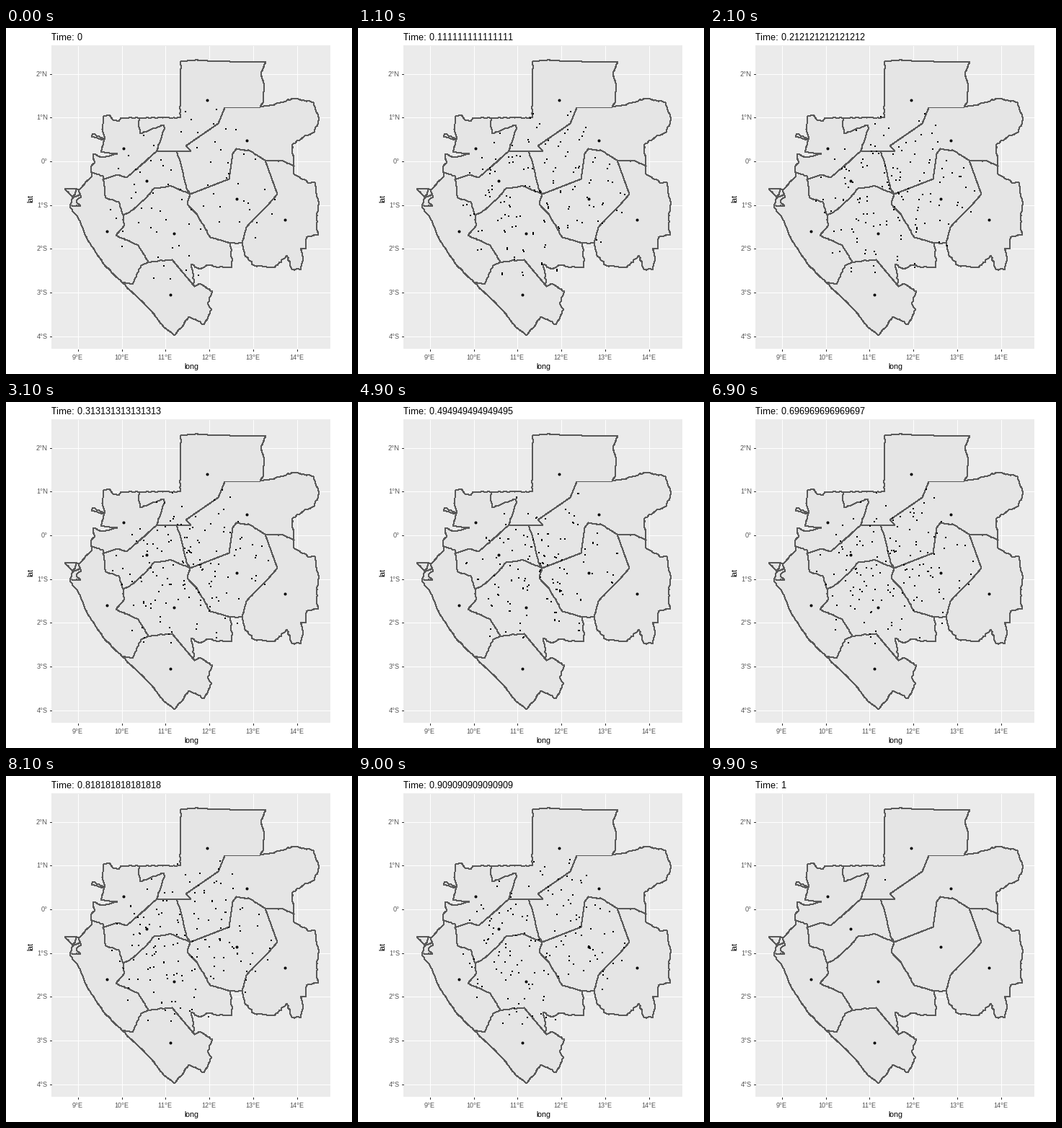
These frames come from a looping animation (480 px wide and 480 px high, 10000 ms). A matplotlib script:

```python
import numpy as np
import matplotlib.pyplot as plt
from matplotlib.animation import FuncAnimation
from matplotlib.patches import Rectangle

FRAMES = 100
SIZE = 480
DEG = 60.7
X9, Y0 = 99.5, 184.5
LEFT, TOP, RIGHT, BOTTOM = 63, 24, 450, 445
INK, TICK, LABEL = "#595959", "#333333", "#4D4D4D"

plt.rcParams.update({
    "font.family": "Liberation Sans",
    "text.hinting": "native",
    "text.hinting_factor": 1,
    "path.simplify": False,
})

rng = np.random.default_rng(4)

# Province centres, in alphabetical order of province
CENTRES = np.array([(162, 166), (386, 265), (194, 211), (232, 284), (227, 369),
                    (333, 155), (319, 236), (139, 281), (278, 99)], float)

# Outline, clockwise; each part starts where the one before it ends
NORTH = [(133, 140), (135, 122), (143, 120), (148, 127), (156, 129), (159, 124),
         (241, 124), (242, 46), (262, 44), (305, 46), (360, 47)]
EAST = [(353, 62), (357, 80), (357, 102), (352, 109), (373, 105), (400, 97),
        (426, 103), (434, 126), (427, 144), (414, 149), (396, 162), (399, 191),
        (398, 201), (418, 214), (428, 214), (433, 240), (430, 272), (433, 286),
        (416, 290), (416, 305), (408, 306), (412, 318), (408, 335), (396, 334),
        (389, 315), (372, 332), (344, 329), (330, 314), (327, 298)]
SOUTH = [(311, 298), (313, 332), (288, 331), (281, 328), (268, 334), (257, 327),
         (261, 358), (268, 354), (286, 365), (279, 381), (285, 390), (274, 411),
         (253, 400), (244, 414), (233, 426)]
COAST = [(218, 414), (199, 390), (185, 376), (160, 352), (135, 327), (113, 294),
         (99, 262), (88, 248), (92, 234), (81, 222), (102, 223), (119, 204),
         (117, 192), (122, 187), (120, 174), (133, 179), (154, 174), (131, 171),
         (136, 155), (118, 150), (120, 146), (137, 154), (133, 140)]
LAGOON = [(97, 224), (92, 236), (103, 231), (100, 225), (104, 234), (97, 239),
          (103, 247), (91, 246)]

STRAIGHT = [
    [(352, 110), (303, 110), (294, 132), (249, 163), (256, 170), (208, 171)],
    [(255, 230), (309, 209), (314, 174), (319, 167)],
    [(359, 183), (376, 230), (362, 246)],
    [(230, 321), (261, 358)],
]
WINDING = [
    [(185, 125), (183, 131), (186, 146), (218, 134), (219, 140), (208, 171),
     (200, 178), (167, 207), (153, 203), (134, 210)],
    [(119, 200), (134, 205), (138, 235), (156, 241), (162, 259), (171, 255),
     (191, 238), (205, 222), (229, 219), (255, 230)],
    [(236, 171), (242, 188), (250, 222), (255, 230), (251, 244), (265, 259),
     (283, 290), (311, 298)],
    [(319, 167), (338, 170), (359, 183), (384, 184), (399, 191)],
    [(362, 246), (343, 265), (333, 276), (327, 298)],
    [(162, 259), (163, 274), (152, 287), (183, 301), (197, 324), (230, 321)],
    [(197, 324), (187, 329), (175, 355), (160, 352)],
]


def rough(points, amp=0.6, step=3):
    """Subdivide a line and nudge the inner points."""
    pts = np.array(points, float)
    out = [pts[:1]]
    for a, b in zip(pts, pts[1:]):
        n = max(1, int(np.hypot(*(b - a)) // step))
        seg = a + (b - a) * np.linspace(0, 1, n + 1)[1:, None]
        seg[:-1] += rng.uniform(-amp, amp, (n - 1, 2))
        out.append(seg)
    return np.vstack(out)


fig = plt.figure(figsize=(SIZE / 72, SIZE / 72), dpi=72, facecolor="white")
ax = fig.add_axes([0, 0, 1, 1])
ax.set_xlim(0, SIZE)
ax.set_ylim(SIZE, 0)
ax.axis("off")


def line(xy, color=INK, z=3):
    x, y = np.asarray(xy, float).T
    ax.plot(x + 0.5, y + 0.5, color=color, lw=1, antialiased=False, zorder=z)


def write(x, y, s, size, color="black", **kw):
    return ax.text(x, y, s, fontsize=size, color=color, **kw)


def draw_panel():
    ax.add_patch(Rectangle((LEFT, TOP), RIGHT - LEFT, BOTTOM - TOP,
                           fc="#EBEBEB", ec="none", zorder=0))
    for lon in range(9, 15):
        x = int(X9 + (lon - 9) * DEG)
        line([(x, TOP), (x, BOTTOM - 1)], "white", 1)
        line([(x, BOTTOM), (x, BOTTOM + 2)], TICK)
        write(x + 0.5, 460, f"{lon}°E", 9, LABEL, ha="center", va="baseline")
    for lat in range(-4, 3):
        y = int(Y0 - lat * DEG)
        line([(LEFT, y), (RIGHT - 1, y)], "white", 1)
        line([(LEFT - 3, y), (LEFT - 1, y)], TICK)
        name = f"{abs(lat)}°" + ("N" if lat > 0 else "S" if lat < 0 else "")
        write(58, y + 4, name, 9, LABEL, ha="right", va="baseline")
    write(257, 473, "long", 11, ha="center", va="baseline")
    write(39, 237, "lat", 11, ha="right", va="center", rotation=90)


def draw_map():
    edge = rough(NORTH, 0.3)
    for part, amp in ((EAST, 1.0), (SOUTH, 0.9), (COAST, 0.6)):
        edge = np.vstack([edge, rough([edge[-1], *part], amp)])
    ax.fill(*(edge + 0.5).T, fc="#E5E5E5", ec="none", zorder=2)
    line(edge)
    line(rough(LAGOON, 0.9))
    for path in STRAIGHT:
        line(path)
    for path in WINDING:
        line(rough(path))


draw_panel()
draw_map()
ax.plot(*(CENTRES + 0.5).T, "o", color="black", ms=4, mew=0, zorder=5)

# Each trip covers the middle half of the way between two centres
trips = [(a, b) for b in range(9) for a in range(9) if a != b]
src = CENTRES[[a for a, _ in trips]]
dst = CENTRES[[b for _, b in trips]]
begin = src + 0.25 * (dst - src)
end = src + 0.75 * (dst - src)

dots, = ax.plot([], [], "s", color="black", ms=2, mew=0,
                antialiased=False, zorder=4)
title = write(63, 17, "", 13, va="baseline")


def update(i):
    t = i / (FRAMES - 1)
    trip = begin + t * (end - begin)
    # Links run from the start of one trip to the end of the one before it
    link = begin[1:] + t * (end[:-1] - begin[1:])
    pts = trip[-1:] if i == FRAMES - 1 else np.vstack([trip, link])
    dots.set_data(*np.round(pts).T)
    title.set_text(f"Time: {t:.15g}")
    return dots, title


anim = FuncAnimation(fig, update, frames=FRAMES, interval=100,
                     repeat=True, repeat_delay=0, blit=False)
plt.show()
```
